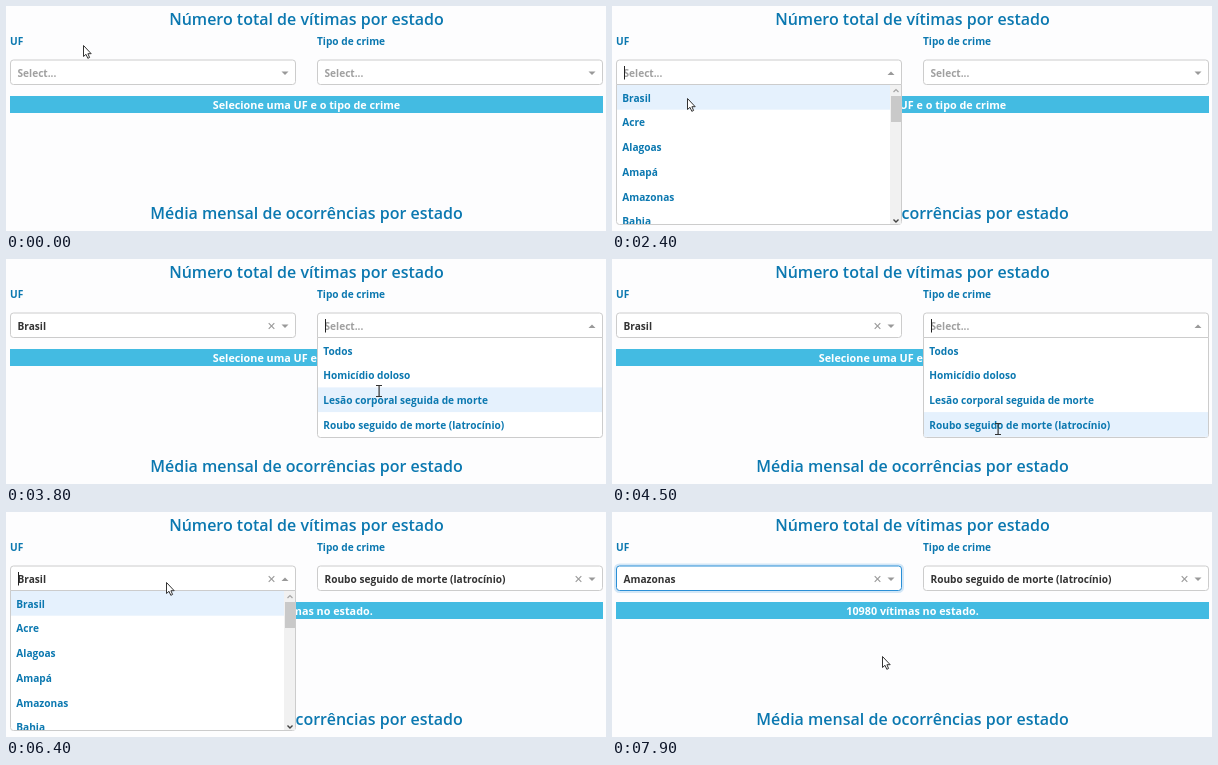
Recreate the animation shown at these times as an HTML page with a canvas. Size 600 px wide and 225 px high, loop 8 s.

```html
<!DOCTYPE html>
<html lang="pt-BR">
<head>
<meta charset="utf-8">
<style>
  html, body { margin: 0; width: 100%; height: 100%; overflow: hidden; background: #fdfdfe; }
  canvas { display: block; }
</style>
</head>
<body>
<canvas id="stage" width="600" height="225"></canvas>
<script>
const ctx = document.getElementById('stage').getContext('2d');
const LOOP = 8000, STEP = 100, ROW = 24.7, MENU_TOP = 79;
const BLUE = '#0b78b0', GREY = '#999', BORDER = '#ccc', TEXT = '#333';

const states = ['Brasil', 'Acre', 'Alagoas', 'Amapá', 'Amazonas', 'Bahia'];
const crimes = ['Todos', 'Homicídio doloso', 'Lesão corporal seguida de morte',
  'Roubo seguido de morte (latrocínio)'];

// Pointer path: time, x, y
const path = [
  [0, 77, 39], [300, 77, 39], [1200, 68, 74], [1500, 68, 74], [2400, 75, 92],
  [2500, 75, 92], [3100, 354, 74], [3400, 354, 74], [4100, 385, 169],
  [4300, 386, 170], [4600, 386, 170], [4700, 386, 163], [5100, 386, 163],
  [5400, 306, 135], [5700, 306, 135], [6300, 160, 70], [6400, 160, 70],
  [6800, 160, 168], [7200, 165, 188], [7400, 165, 188], [7900, 270, 144], [8000, 270, 144]
];

const within = (t, from, to) => t >= from && t < to;

function pointerAt(t) {
  const i = path.findIndex(key => key[0] > t);
  const [t0, x0, y0] = path[i - 1], [t1, x1, y1] = path[i];
  const u = (t - t0) / (t1 - t0), ease = u * u * (3 - 2 * u);
  return { x: x0 + (x1 - x0) * ease, y: y0 + (y1 - y0) * ease };
}

function text(str, x, y, color, size = 10.15, weight = 700, align = 'left') {
  ctx.font = `${weight} ${size}px "Open Sans", "Noto Sans", sans-serif`;
  ctx.textAlign = align;
  ctx.fillStyle = color;
  ctx.fillText(str, x, y);
}

function rect(x, y, w, h, color) {
  ctx.fillStyle = color;
  ctx.fillRect(x, y, w, h);
}

function polygon(points, fill, stroke) {
  ctx.beginPath();
  points.forEach(([x, y]) => ctx.lineTo(x, y));
  ctx.closePath();
  ctx.fillStyle = fill;
  ctx.fill();
  if (stroke) {
    ctx.strokeStyle = stroke;
    ctx.lineWidth = 1;
    ctx.stroke();
  }
}

function line(points, color, width = 1) {
  ctx.beginPath();
  points.forEach(([x, y]) => ctx.lineTo(x, y));
  ctx.strokeStyle = color;
  ctx.lineWidth = width;
  ctx.stroke();
}

function box(x, y, w, h, radii, color, width = 1) {
  ctx.beginPath();
  ctx.roundRect(x, y, w, h, radii);
  ctx.fillStyle = '#fff';
  ctx.fill();
  ctx.strokeStyle = color;
  ctx.lineWidth = width;
  ctx.stroke();
}

function select(x, { value, focused, openedAt }, t) {
  const open = openedAt !== null;
  if (focused) box(x - 0.5, 53, 287, 26.5, 4, '#d3e7f7', 3);
  box(x + 0.5, 54, 285, 24.5, open ? [3, 3, 0, 0] : 3, focused ? '#2a8fd6' : BORDER);
  text(value || 'Select...', x + 7.5, 70.6, value ? TEXT : '#a0a0a0');
  if (value) {
    line([[x + 258.7, 64.2], [x + 264.3, 69.8]], GREY, 1.1);
    line([[x + 264.3, 64.2], [x + 258.7, 69.8]], GREY, 1.1);
  }
  const base = open ? 69 : 65.5, tip = open ? 65.5 : 69;
  polygon([[x + 271.5, base], [x + 278.5, base], [x + 275, tip]], GREY);
  if (open && (t - openedAt) % 1000 < 500) rect(x + 8, 60, 1, 13.5, '#222');
}

function menu(x, options, height, pointer, scrolls) {
  const hovered = Math.max(0, Math.floor((pointer.y - MENU_TOP) / ROW));
  box(x + 0.5, MENU_TOP - 0.5, 285, height, [0, 0, 3, 3], BORDER);
  ctx.save();
  ctx.beginPath();
  ctx.rect(x + 1, MENU_TOP, 284, height - 1);
  ctx.clip();
  options.forEach((name, i) => {
    const y = MENU_TOP + i * ROW;
    if (i === hovered) rect(x + 1, y, 284, ROW, '#e5f1fd');
    text(name, x + 6.3, y + 16.7, BLUE);
  });
  if (scrolls) {
    rect(x + 274, MENU_TOP, 11, height, '#f1f1f1');
    rect(x + 275, 90, 10, 26, '#c9c9c9');
    line([[x + 277.5, 86], [x + 280, 83.5], [x + 282.5, 86]], '#a5a5a5', 1.2);
    line([[x + 277.5, 213.5], [x + 280, 216], [x + 282.5, 213.5]], '#444', 1.4);
  }
  ctx.restore();
}

function drawPointer({ x, y }, isBeam) {
  if (isBeam) {
    x = Math.round(x);
    y = Math.round(y);
    rect(x - 0.5, y - 5, 1.2, 10, TEXT);
    for (const dy of [-6, 5]) rect(x - 3, y + dy, 6, 1, TEXT);
    return;
  }
  const outline = [[0, 0], [0, 11], [2.5, 8.8], [4.3, 12.8], [6.1, 12], [4.4, 8.2], [7.7, 8.2]];
  polygon(outline.map(([dx, dy]) => [x + 0.5 + dx, y + 0.5 + dy]), '#fff', '#333');
}

function draw(t) {
  const pointer = pointerAt(t);
  const stateOpen = within(t, 1300, 2500) ? 1300 : within(t, 6400, 7400) ? 6400 : null;
  const crimeOpen = within(t, 3500, 4700) ? 3500 : null;

  rect(0, 0, 600, 225, '#fdfdfe');
  text('Número total de vítimas por estado', 300.5, 18.5, BLUE, 16, 600, 'center');
  text('Média mensal de ocorrências por estado', 300.5, 213, BLUE, 16, 600, 'center');
  text('UF', 4, 38.6, BLUE);
  text('Tipo de crime', 311, 38.6, BLUE);

  rect(4, 90, 593, 17, '#43bbe2');
  const message = t < 5200 ? 'Selecione uma UF e o tipo de crime' : '10980 vítimas no estado.';
  text(message, 300.5, 103, '#fff', 10.8, 700, 'center');

  select(4, {
    value: t < 2500 ? '' : t < 7400 ? 'Brasil' : 'Amazonas',
    focused: within(t, 2500, 3500) || t >= 7400,
    openedAt: stateOpen
  }, t);
  select(311, {
    value: t < 4700 ? '' : crimes[3],
    focused: within(t, 4700, 6400),
    openedAt: crimeOpen
  }, t);

  if (stateOpen !== null) menu(4, states, 140, pointer, true);
  if (crimeOpen !== null) menu(311, crimes, 100, pointer, false);
  drawPointer(pointer, within(t, 1300, 1900) || crimeOpen !== null);
}

function frame() {
  const t = performance.now() % LOOP;
  draw(Math.floor(t / STEP) * STEP);
  requestAnimationFrame(frame);
}
frame();
</script>
</body>
</html>
```
